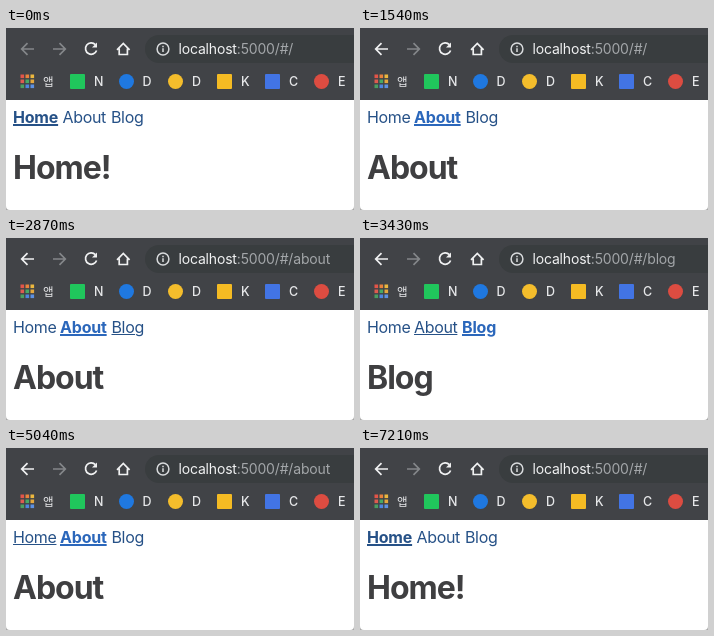
Write an HTML page that moves like this. It is 348 by 182 pixels and loops after 7280 ms.

```html
<!DOCTYPE html>
<html lang="en">
<head>
<meta charset="utf-8">
<title>Hash routing</title>
<style>
  html, body { margin: 0; width: 100%; height: 100%; overflow: hidden; background: #fff; }
  body { position: relative; font-family: Inter, "Noto Sans CJK KR", "Noto Sans CJK", sans-serif; }
  svg { position: absolute; left: 0; top: 0; }
  .mark { font-size: 12.5px; font-weight: 500; fill: #e6e7e9; }
  .mark:first-of-type { font-size: 11.5px; }
  .url { font-size: 14px; letter-spacing: -.17px; fill: #a3a6a9; }
  a, h1 { position: absolute; margin: 0; white-space: pre; }
  a {
    top: 80px; font-size: 16px; line-height: 19px; letter-spacing: -.35px;
    color: #265187; text-underline-offset: 1px; text-decoration-thickness: 1px;
  }
  a.hover { text-decoration-line: underline; }
  a.active {
    font-weight: 700; letter-spacing: -.2px;
    text-decoration-line: underline; text-decoration-thickness: 1.5px;
  }
  h1 { left: 7px; top: 120px; font-size: 32px; line-height: 40px; letter-spacing: -1px; color: #3f3f41; }
</style>
</head>
<body>
<svg width="348" height="182" viewBox="0 0 348 182">
  <rect width="348" height="72" fill="#414347"/>
  <rect x="139" y="7" width="240" height="28" rx="14" fill="#393d3f"/>
  <g transform="translate(0 .5)" fill="none" stroke="#f0f1f2" stroke-width="1.7">
    <path id="back" d="M28 20.5H16M21.5 14.7L15.7 20.5L21.5 26.3"/>
    <path d="M47 20.5H59M53.5 14.7L59.3 20.5L53.5 26.3" stroke="#84878a"/>
    <path d="M89.4 16.2A5.7 5.7 0 1 0 90.6 22"/>
    <path d="M111 21.3L117.3 15L123.6 21.3M113.2 20V26H121.4V20"/>
    <path d="M91 14V19H86Z" fill="#f0f1f2" stroke="none"/>
    <g stroke="#d9dbdd" stroke-width="1.5">
      <circle cx="157" cy="20.5" r="5.9"/>
      <path d="M157 19.8V23.6M157 17.3V18.7"/>
    </g>
  </g>
  <text class="url" x="172.5" y="26"><tspan fill="#f0f1f2">localhost</tspan>:5000/#/<tspan id="path"></tspan></text>
  <g id="marks"></g>
  <path d="M0 182V178A4 4 0 0 0 4 182ZM348 182V178A4 4 0 0 1 344 182Z" fill="#aaa"/>
</svg>
<a>Home</a><a>About</a><a>Blog</a>
<h1></h1>
<script>
const LOOP = 7280;
const HOME = 0, ABOUT = 1, BLOG = 2, NONE = -1;
const byId = id => document.getElementById(id);
const links = [...document.querySelectorAll('a')];
const heading = document.querySelector('h1');

// Each track lists [start in ms, value].
const pages = [[0, HOME], [1540, ABOUT], [2940, BLOG], [3990, ABOUT], [5110, HOME]];
const paths = [[0, ''], [1610, 'about'], [3010, 'blog'], [4060, 'about'], [5180, '']];
const hovers = [[0, NONE], [1190, ABOUT], [2240, BLOG], [3430, ABOUT], [4340, HOME], [5600, NONE]];

const titles = ['Home!', 'About', 'Blog'];
const linkX = [[7, 56.5, 105], [7, 54, 105.5], [7, 54, 102]];

// Bookmark bar: [label, label x, icon x, icon colour, round icon]
const marks = [
  ['앱', 37], ['N', 88, 64, '#20c65c'], ['D', 136.5, 113, '#1f78e0', true],
  ['D', 186, 162, '#f4bd2c', true], ['K', 235, 211, '#f5bb23'],
  ['C', 283, 259, '#4274e4'], ['E', 332, 308, '#dc4c41', true]
];
let bar = '';
const dots = ['#e25549', '#e8823c', '#ecb73e', '#dd5c50', '#49a865', '#e4a83d', '#4a9e62', '#4d86df', '#5d91e2'];
dots.forEach((c, i) => {
  bar += `<rect x="${14.5 + i % 3 * 5}" y="${46.5 + (i / 3 | 0) * 5}" width="3.6" height="3.6" fill="${c}"/>`;
});
for (const [label, x, iconX, color, round] of marks) {
  if (color) {
    bar += `<rect x="${iconX}" y="46" width="15" height="15" rx="${round ? 7.5 : 1}" fill="${color}"/>`;
  }
  bar += `<text class="mark" x="${x}" y="57.5">${label}</text>`;
}
byId('marks').innerHTML = bar;

const at = (track, t) => track.filter(([start]) => start <= t).pop()[1];

function draw(t) {
  const page = at(pages, t), hover = at(hovers, t);
  links.forEach((link, i) => {
    link.style.left = linkX[page][i] + 'px';
    link.className = i === page ? 'active' : i === hover ? 'hover' : '';
    link.style.color = i === page && i !== HOME ? '#2b67bb' : '';
  });
  heading.textContent = titles[page];
  byId('path').textContent = at(paths, t);
  byId('back').style.stroke = t < 1540 ? '#84878a' : '';
}

const begin = performance.now();
function tick() {
  draw((performance.now() - begin) % LOOP);
  requestAnimationFrame(tick);
}
tick();
</script>
</body>
</html>
```
